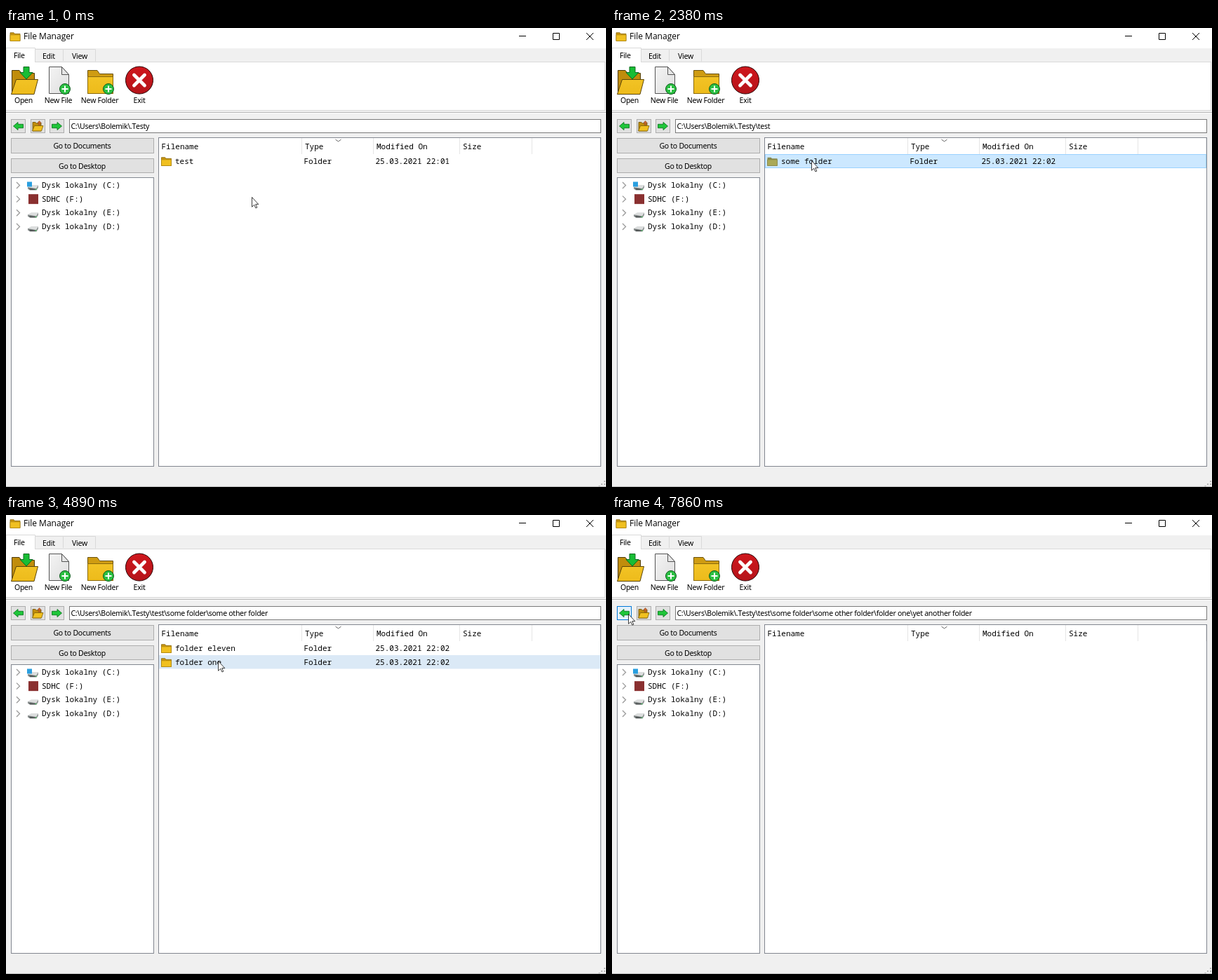
Write an HTML page that moves like this. It is 855 px wide and 655 px high and loops after 8 s.

```html
<!DOCTYPE html>
<html lang="en">
<head>
<meta charset="utf-8">
<title>File Manager</title>
<style>
  html, body { margin: 0; width: 100%; height: 100%; overflow: hidden; background: #f0f0f0; }
  svg { display: block; width: 855px; height: 655px; }
  text { font: 10.5px "Noto Sans", sans-serif; font-kerning: none; letter-spacing: -.27px; fill: #000; white-space: pre; }
  .title { font: 12px "Open Sans", sans-serif; letter-spacing: 0; }
  .mono text { font: 11px "Noto Sans Mono", monospace; letter-spacing: 0; }
  .mid { text-anchor: middle; }
  .btn { fill: #e1e1e1; stroke: #adadad; }
  .btn.hot { fill: #e5f1fb; stroke: #0078d7; }
  .pane { fill: #fff; stroke: #828790; }
  .line { fill: none; stroke: #000; }
</style>
</head>
<body>
<svg viewBox="0 0 855 655">
  <defs>
    <linearGradient id="gold" x2="0" y2="1"><stop stop-color="#f2c325"/><stop offset="1" stop-color="#edbb1b"/></linearGradient>
    <linearGradient id="paper" x2="1" y2="1"><stop stop-color="#f4f4f4"/><stop offset="1" stop-color="#dedede"/></linearGradient>
    <linearGradient id="red" x2="0" y2="1"><stop stop-color="#cf171d"/><stop offset="1" stop-color="#b5141a"/></linearGradient>
    <g id="folder" stroke-width=".8">
      <path d="M.5 12.5V.7H5.6L7 2.3H14.5V12.5Z" fill="#c8950f" stroke="#8a680c"/>
      <path d="M.5 12.5V3.8H14.5V12.5Z" fill="#f0c020" stroke="#b08710"/>
    </g>
    <g id="plus">
      <circle r="7.5" fill="#2cc043" stroke="#0c5a1b"/>
      <path d="M-4.5 0H4.5M0-4.5V4.5" stroke="#fff" stroke-width="2"/>
    </g>
    <path id="arrow" d="M-7 0L-.5-5.5V-2.7H7V2.7H-.5V5.5Z" fill="#1fc63a" stroke="#0f7a22" stroke-width=".9"/>
    <g id="drive">
      <path d="M0 4L5 1H15L14.5 4.5L12 6Z" fill="#dcdede"/>
      <path d="M0 4L12 6L15 1.5V4.5L12.5 8.5H3L0 6.5Z" fill="#8d9292"/>
      <path d="M1.5 5.6L11.5 6.8V8H3.5Z" fill="#4f5454"/>
      <path d="M10.5 7.2H12.5" stroke="#3fd05c"/>
    </g>
  </defs>

  <rect width="855" height="655" fill="#f0f0f0"/>
  <rect width="855" height="29" fill="#fff"/>
  <use href="#folder" x="5.5" y="6"/>
  <text class="title" x="25" y="16">File Manager</text>
  <path class="line" d="M731 11.5H741M779.5 7.5H788.5V16.5H779.5ZM827 7L837 17M837 7L827 17"/>

  <g stroke="#d9d9d9">
    <path d="M41.5 47.5V30.5H127.5V47.5M81.5 31V47" fill="#f0f0f0"/>
    <rect x="-.5" y="48.5" width="854" height="69" fill="#fff"/>
    <path d="M0 49V28.5H41.5V49" fill="#fff"/>
    <path d="M0 120.5H855" stroke="#b4b4b4"/>
    <path d="M0 121.5H855" stroke="#fff"/>
    <path d="M0 654.5H855" stroke="#bdbdbd"/>
  </g>
  <text x="11" y="43">File</text>
  <text x="52" y="44">Edit</text>
  <text x="94" y="44">View</text>

  <g stroke-linejoin="round">
    <path d="M8.5 93V60.5H19L22 64.5H40.5V93Z" fill="#c08d0c" stroke="#4d3a07"/>
    <path d="M14.5 73.5H45.5L40 94.5H7.5Z" fill="url(#gold)" stroke="#5c460a"/>
    <path d="M25 55.5H33V63.5H38L29 73L20 63.5H25Z" fill="#18bd35" stroke="#0b6a1e"/>
    <path d="M61.5 55.5H79.5L89.5 66.5V93.5H61.5Z" fill="url(#paper)" stroke="#555"/>
    <path d="M79.5 55.5V66.5H89.5Z" fill="#e6e6e6" stroke="#555"/>
    <path d="M116.5 93.5V60.5H130L133.5 65.5H152.5V93.5Z" fill="#cf9c12" stroke="#6a510a"/>
    <path d="M116.5 93.5V69.5H152.5V93.5Z" fill="url(#gold)" stroke="#8a6a0d"/>
    <circle cx="190" cy="74.5" r="19.5" fill="url(#red)" stroke="#2a0506"/>
    <path d="M182.5 67L197.5 82M197.5 67L182.5 82" stroke="#fff" stroke-width="4.8" stroke-linecap="round"/>
  </g>
  <use href="#plus" x="84" y="87"/>
  <use href="#plus" x="146" y="87"/>
  <g class="mid">
    <text x="25" y="107">Open</text>
    <text x="74.5" y="107">New File</text>
    <text x="133.5" y="107">New Folder</text>
    <text x="190" y="107">Exit</text>
  </g>

  <rect class="btn" id="back" x="7.5" y="130.5" width="20" height="19"/>
  <rect class="btn" x="35.5" y="130.5" width="20" height="19"/>
  <rect class="btn" x="62.5" y="130.5" width="20" height="19"/>
  <use href="#arrow" x="17.5" y="140"/>
  <use href="#arrow" transform="translate(72.5 140) scale(-1 1)"/>
  <g stroke-width=".8">
    <path d="M38 147V134.5H42L43.5 136H50V147Z" fill="#c08d0c" stroke="#6a510a"/>
    <path d="M40.5 139.5H53L50.5 147H37.5Z" fill="#f0c020" stroke="#7c5d0a"/>
    <path d="M47.5 132.5L50.5 135.5H48.7V138.5H46.3V135.5H44.5Z" fill="#c8642c" stroke="#8a4a1c" stroke-width=".5"/>
  </g>
  <rect x="90.5" y="130.5" width="757" height="19" fill="#fff" stroke="#7a7a7a"/>
  <text id="path" x="92.5" y="144"></text>

  <rect class="btn" x="7.5" y="157.5" width="203" height="21"/>
  <rect class="btn" x="7.5" y="186.5" width="203" height="20"/>
  <text class="mid" x="108.5" y="172">Go to Documents</text>
  <text class="mid" x="108.5" y="201">Go to Desktop</text>
  <rect class="pane" x="7.5" y="213.5" width="203" height="412"/>
  <rect class="pane" x="217.5" y="156.5" width="630" height="469"/>

  <g class="mono" id="tree"></g>
  <g class="mono">
    <path d="M421.5 157V180M523.5 157V180M646.5 157V180M749.5 157V180M846.5 157V180" stroke="#e5e5e5"/>
    <path class="line" d="M469.5 159L473.5 162L477.5 159" style="stroke: #666"/>
    <text x="221.5" y="172.5">Filename</text>
    <text x="426" y="172.5">Type</text>
    <text x="528" y="172.5">Modified On</text>
    <text x="651" y="172.5">Size</text>
  </g>
  <g class="mono" id="rows"></g>
  <path d="M853 646V654M849 650V654M845.5 653V654.5" stroke="#b5b5b5" stroke-width="2" stroke-dasharray="2 2"/>
  <circle id="halo" r="12.5" fill="#f5ec00"/>
  <path id="cursor" d="M.5.5V14.3L3.7 11.3L5.9 16L7.8 15.2L5.7 10.6H9.8Z" fill="#fff" stroke="#1c1c1c" stroke-width=".85"/>
</svg>

<script>
const LOOP = 8000;
const $ = id => document.getElementById(id);

// Each level: time it opens, folder entered, rows it lists, clock time
const levels = [
  [0, '', ['test'], '22:01'],
  [1510, 'test', ['some folder'], '22:02'],
  [2560, 'some folder', ['some other folder'], '22:02'],
  [3730, 'some other folder', ['folder eleven', 'folder one'], '22:02'],
  [5320, 'folder one', ['yet another folder'], '22:02'],
  [6490, 'yet another folder', [], '']
];

// Pointer moves: start, number of steps, end x, end y
const STEP = 61;
const origin = [350, 241];
const moves = [
  [600, 11, 281, 195],
  [1950, 6, 284, 189],
  [2870, 4, 283, 190],
  [4530, 7, 303, 209],
  [5630, 8, 286, 194],
  [7050, 13, 24, 141],
  [7860, 1, 23, 141]
];

// Hovers: time, row. Double clicks: first press, second press, row
const hovers = [[1090, 0], [1950, 0], [2870, 0], [4530, 0], [4710, 1], [5890, 0]];
const clicks = [[1270, 1450, 0], [2310, 2500, 0], [3490, 3610, 0], [5140, 5260, 1], [6250, 6370, 0]];
const GLOW = .62;

const marks = [
  ...levels.map(([t]) => [t, 0, '', 0]),
  ...hovers.map(([t, row]) => [t, row, 'hover', 0]),
  ...clicks.flatMap(([a, b, row]) => [
    [a, row, 'sel', GLOW], [a + 60, row, 'sel', 0], [b, row, 'sel', GLOW]
  ])
].sort((a, b) => a[0] - b[0]);

const lastAt = (list, t) => list.findLastIndex(item => item[0] <= t);
const ease = p => p * p * (3 - 2 * p);

function pointer(t) {
  let [x, y] = origin;
  for (const [start, steps, ex, ey] of moves) {
    if (t < start) break;
    const done = Math.min(steps, Math.floor((t - start) / STEP) + 1);
    const p = ease(done / steps);
    x += (ex - x) * p;
    y += (ey - y) * p;
  }
  return [Math.round(x), Math.round(y)];
}

function rowMarkup(name, i, time, state) {
  const y = Math.round(180 + i * 19.6);
  const base = i ? '#f5f5f5' : '#fff';
  const fill = { sel: '#cce8ff', hover: i ? '#dbe9f6' : '#e5f3ff' }[state] || base;
  const edge = state === 'sel'
    ? `<rect x="218.5" y="${y + .5}" width="628" height="19" fill="none" stroke="#99d1ff"/>` : '';
  const icon = state === 'sel'
    ? `<path d="M221.5 ${y + 16.5}v-11.8h5.1l1.4 1.6h7.5v10.2Z" fill="#87884f"/>
       <path d="M221.5 ${y + 16.5}v-8.7h14v8.7Z" fill="#aaa957" stroke="#858345" stroke-width=".8"/>`
    : `<use href="#folder" x="221" y="${y + 4}"/>`;
  return `<rect x="218" y="${y}" width="629" height="19.5" fill="${fill}"/>${edge}${icon}
    <text x="241" y="${y + 14}">${name}</text>
    <text x="424.5" y="${y + 14}">Folder</text>
    <text x="526.5" y="${y + 14}">25.03.2021 ${time}</text>`;
}

function drawTree() {
  const names = ['Dysk lokalny (C:)', 'SDHC (F:)', 'Dysk lokalny (E:)', 'Dysk lokalny (D:)'];
  $('tree').innerHTML = names.map((name, i) => {
    const y = 224.5 + i * 19.65;
    const icon = i === 1
      ? `<rect x="32" y="${y - 7}" width="14" height="14" fill="#8a3030"/>`
      : `<use href="#drive" x="31" y="${y - 1.5}"/>`;
    const badge = i ? '' : `<rect x="30" y="${y - 5}" width="7" height="7" fill="#2a9fe0"/>`;
    return `<path d="M15 ${y - 4.5}l4.5 4.5l-4.5 4.5" fill="none" stroke="#999" stroke-width="1.3"/>
      ${icon}${badge}<text x="51" y="${Math.round(y + 3.5)}">${name}</text>`;
  }).join('');
}

let shown = '';
function draw(t) {
  const level = lastAt(levels, t);
  const mark = lastAt(marks, t);
  const [, row, state, glow] = marks[mark];
  const key = level + '/' + mark;
  if (key !== shown) {
    shown = key;
    const [, , names, time] = levels[level];
    $('path').textContent = ['C:', 'Users', 'Bolemik', '.Testy',
      ...levels.slice(1, level + 1).map(l => l[1])].join('\\');
    $('rows').innerHTML = names.map((n, i) => rowMarkup(n, i, time, i === row ? state : '')).join('');
    $('halo').setAttribute('opacity', glow);
  }
  const [x, y] = pointer(t);
  const place = `translate(${x} ${y})`;
  $('cursor').setAttribute('transform', place);
  $('halo').setAttribute('transform', place);
  $('back').classList.toggle('hot', x < 28 && y < 150);
}

drawTree();
const begin = performance.now();
function tick() {
  draw((performance.now() - begin) % LOOP);
  requestAnimationFrame(tick);
}
tick();
</script>
</body>
</html>
```
